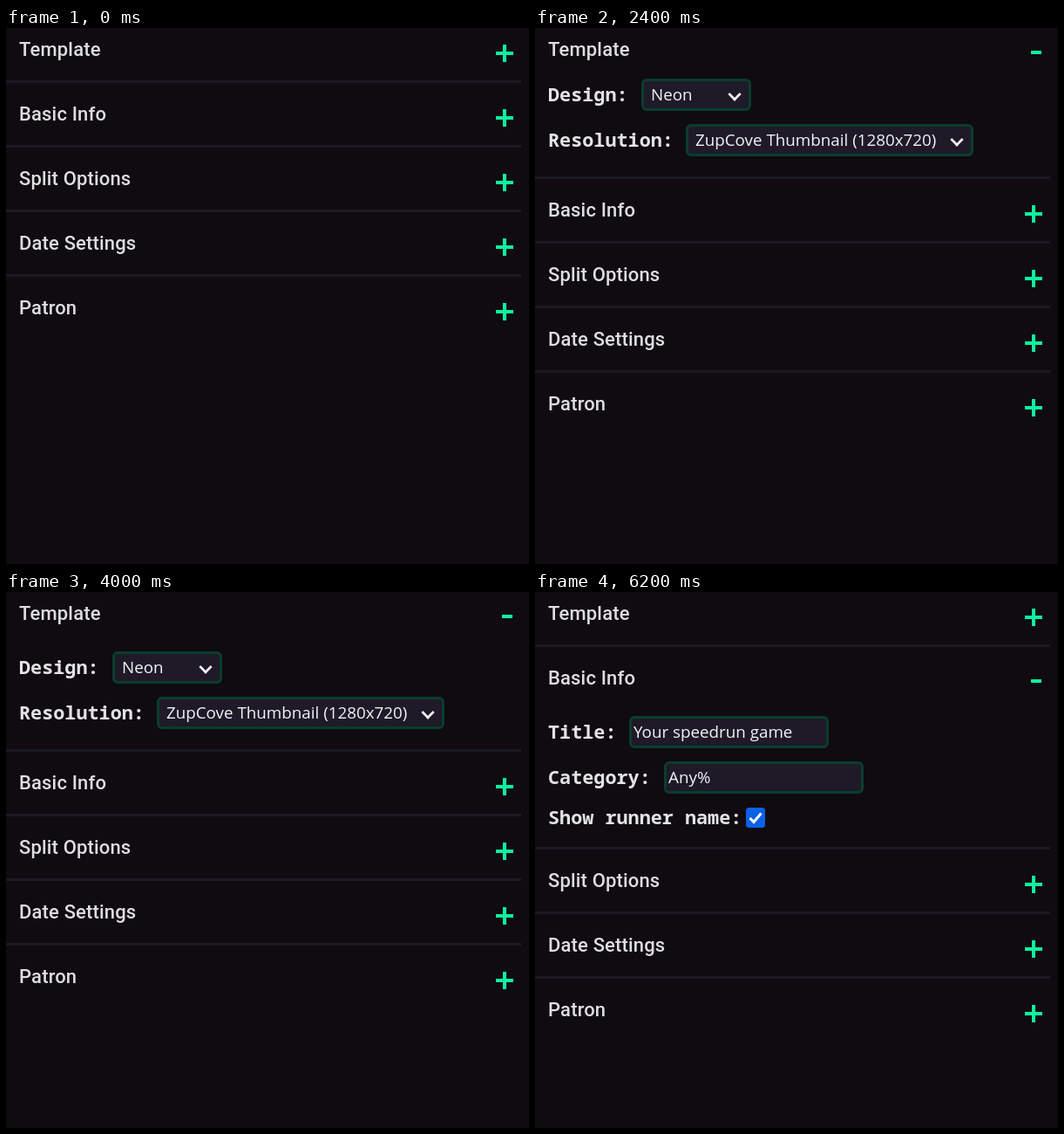
Animation of 600 by 614 pixels, one loop 8000 ms. Source, as an HTML page:

```html
<!DOCTYPE html>
<html lang="en">
<head>
<meta charset="utf-8">
<title>Settings accordion</title>
<style>
  :root {
    --bg: #0f0b10;
    --line: #1b1924;
    --accent: #0df2a0;
    --loop: 8s infinite;
    --slide: cubic-bezier(.165, .84, .44, 1);
  }
  * { box-sizing: border-box; }
  html, body { margin: 0; width: 100%; height: 100%; overflow: hidden; background: var(--bg); }
  main { position: absolute; top: -14px; left: 0; width: 600px; }

  section { position: relative; padding-top: 54px; }
  section::before {
    content: ""; position: absolute; left: 0; top: 0;
    width: 591px; height: 3px; background: var(--line);
  }
  h2 {
    position: absolute; left: 15px; top: 28px; margin: 0;
    font: 500 22px/22px Roboto, sans-serif; letter-spacing: .15px; color: #dededf;
  }
  .icon {
    position: absolute; left: 562px; top: 33px; width: 20px; height: 20px;
    background:
      linear-gradient(var(--accent), var(--accent)) right 8px / 20px 4px no-repeat,
      linear-gradient(var(--accent), var(--accent)) 8px 0 / 4px 20px no-repeat;
  }

  /* Panels grow downwards while their content stays attached to the lower edge. */
  .panel { position: relative; height: 20px; overflow: hidden; }
  .content { position: absolute; left: 0; bottom: 0; width: 100%; height: var(--h); }
  .template { --h: 120px; }
  .basic { --h: 158.5px; }

  .row { position: absolute; left: 15px; height: 37px; }
  .row > label {
    position: absolute; left: 0; top: 0; white-space: pre;
    font: 600 21.8px/36px "Noto Sans Mono", monospace; color: #e3e3e4;
  }
  .field {
    position: absolute; top: 0; height: 37px; padding-left: 2px;
    border: 3px solid #0a3d2d; border-radius: 6px; background: #1e1a28;
    font: 500 18.8px/31px "Open Sans", sans-serif; color: #f3f3f4; white-space: pre;
  }
  .select { padding-left: 8px; }
  .select::after {
    content: ""; position: absolute; right: 10px; top: 9px; width: 9px; height: 9px;
    border: solid #f0f0f0; border-width: 0 3px 3px 0; transform: rotate(45deg) scale(.9);
  }
  .check { position: absolute; left: 227px; top: 7px; width: 22px; height: 23px; }

  .template .panel { animation: template-panel var(--loop) var(--slide); }
  .template .icon { animation: template-icon var(--loop) step-end; }
  .basic .panel { animation: basic-panel var(--loop) var(--slide); }
  .basic .icon { animation: basic-icon var(--loop) step-end; }

  @keyframes template-panel {
    0%, 25% { height: 20px; }
    34.8%, 69.4% { height: 140px; }
    78%, 100% { height: 20px; }
  }
  @keyframes basic-panel {
    0%, 69.4% { height: 20px; }
    78%, 100% { height: 178.5px; }
  }
  @keyframes template-icon {
    24.5% { background-size: 12px 4px, 0 0; background-position: right 1px top 7px, 0 0; }
    69.4% { background-size: 20px 4px, 4px 20px; background-position: right 8px, 8px 0; }
  }
  @keyframes basic-icon {
    69.4%, 100% { background-size: 12px 4px, 0 0; background-position: right 1px top 7px, 0 0; }
  }
</style>
</head>
<body>
<main>
  <section class="template">
    <h2>Template</h2><i class="icon"></i>
    <div class="panel"><div class="content">
      <div class="row" style="top:8px">
        <label>Design:</label>
        <div class="field select" style="left:107px;width:126px">Neon</div>
      </div>
      <div class="row" style="top:60px">
        <label>Resolution:</label>
        <div class="field select" style="left:158px;width:330px">ZupCove Thumbnail (1280x720)</div>
      </div>
    </div></div>
  </section>
  <section class="basic">
    <h2>Basic Info</h2><i class="icon"></i>
    <div class="panel"><div class="content">
      <div class="row" style="top:8px">
        <label>Title:</label>
        <div class="field" style="left:93px;width:229px">Your speedrun game</div>
      </div>
      <div class="row" style="top:60px">
        <label>Category:</label>
        <div class="field" style="left:133px;width:229px">Any%</div>
      </div>
      <div class="row" style="top:106px">
        <label>Show runner name:</label>
        <svg class="check" viewBox="0 0 22 23">
          <rect width="22" height="23" rx="3.5" fill="#0b61e6"/>
          <path d="M4.5 12 9 16.5 17.5 6.5" fill="none" stroke="#fff" stroke-width="3"/>
        </svg>
      </div>
    </div></div>
  </section>
  <section><h2>Split Options</h2><i class="icon"></i><div class="panel"></div></section>
  <section><h2>Date Settings</h2><i class="icon"></i><div class="panel"></div></section>
  <section><h2>Patron</h2><i class="icon"></i><div class="panel"></div></section>
</main>
</body>
</html>
```
